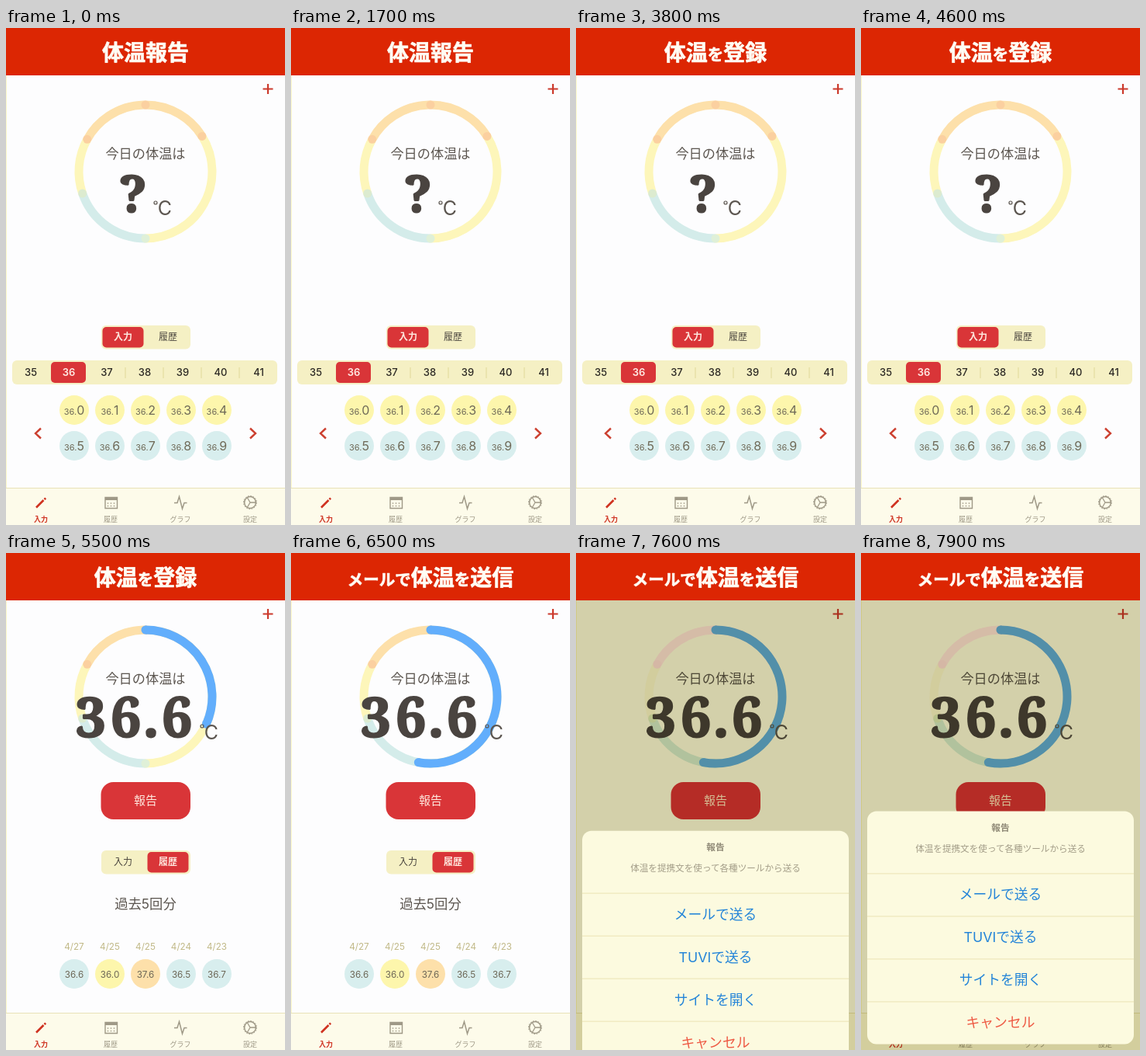
An HTML page for the animation above (8000 ms loop, 360x640 px).

```html
<!DOCTYPE html>
<html lang="ja">
<head>
<meta charset="utf-8">
<style>
  html, body { margin: 0; width: 100%; height: 100%; overflow: hidden; background: #fdfdfe; }
  svg { display: block; width: 360px; height: 640px; }
  text { font-family: Inter, "Noto Sans CJK JP", "Noto Sans CJK", sans-serif; text-anchor: middle; fill: #5c5650; }
  .title text { font-family: "Noto Sans CJK JP", "Noto Sans CJK", sans-serif; font-size: 28px; font-weight: 700;
    fill: #fffdf4; stroke: #fffdf4; stroke-width: .7; stroke-miterlimit: 1; }
  .title .kana { font-size: 20.5px; }
  .value { font-family: "Noto Serif", serif; font-weight: 900; fill: #4a4440; stroke: #4a4440; stroke-width: 2; stroke-miterlimit: 1; }
  .pen { fill: none; }
</style>
</head>
<body>
<svg id="stage" viewBox="0 0 360 640">
  <rect width="360" height="640" fill="#fdfdfe"/>
  <rect y="61" width="1" height="579" fill="#fbf6c8"/>
  <path class="pen" d="M331.500 78.500h13M338 72v13" stroke="#cc3a2c" stroke-width="2.2"/>

  <g id="ring" class="pen" stroke-width="11"></g>
  <text x="180" y="167.500" font-size="17.2">今日の体温は</text>
  <g id="unknown">
    <text class="value" x="164" y="237" font-size="65">?</text>
    <circle cx="193" cy="225" r="2" fill="none" stroke="#5c5650" stroke-width="1.2"/>
    <text x="205" y="241" font-size="25">C</text>
  </g>
  <g id="known">
    <text class="value" x="109.500 154.500 187 220.500" y="236.500" font-size="70">36.6</text>
    <circle cx="253" cy="223" r="2" fill="none" stroke="#5c5650" stroke-width="1.2"/>
    <text x="265" y="239.500" font-size="25">C</text>
  </g>
  <g id="report">
    <rect x="122.500" y="295" width="115.500" height="48" rx="16" fill="#d93538"/>
    <text x="180" y="324" font-size="15" font-weight="500" style="fill:#ffe9df">報告</text>
  </g>

  <rect x="123" y="383" width="115" height="30.500" rx="6" fill="#f5f0c4"/>
  <rect id="thumb" y="385" width="53" height="26.500" rx="5" fill="#d93538"/>
  <text id="tabInput" x="151" y="402" font-size="12">入力</text>
  <text id="tabHistory" x="209" y="402" font-size="12">履歴</text>

  <g id="picker"></g>
  <g id="history"></g>
  <g id="tabbar"></g>

  <rect id="dim" y="61" width="360" height="579" fill="#d5d2ab" style="mix-blend-mode:multiply"/>
  <g id="sheet"></g>

  <rect width="360" height="61" fill="#dc2603"/>
  <g class="title">
    <text x="180" y="42">体温報告</text>
    <text x="180" y="42">体温<tspan class="kana">を</tspan>登録</text>
    <text x="180" y="42"><tspan class="kana">メールで</tspan>体温<tspan class="kana">を</tspan>送信</text>
  </g>
</svg>
<script>
const LOOP = 8000, PICK = 5050, FULL_ANGLE = 190.5;
const TITLE_CUTS = [0, 2600, 6400, LOOP];
const RED = '#d93538', YELLOW = '#fdf6ac', BLUE = '#d8eeee', ORANGE = '#fde0aa', SKY = '#62aefc';
const $ = id => document.getElementById(id);
const clamp = v => Math.max(0, Math.min(1, v));
const ramp = (t, from, to) => clamp((t - from) / (to - from));
const ease = p => (1 - Math.cos(Math.PI * p)) / 2;

function add(parent, tag, attrs, text) {
  const el = document.createElementNS('http://www.w3.org/2000/svg', tag);
  for (const key in attrs) el.setAttribute(key, attrs[key]);
  if (text) el.textContent = text;
  return parent.appendChild(el);
}
function label(parent, text, x, y, size, color, weight = 400) {
  return add(parent, 'text', { x, y, 'font-size': size, 'font-weight': weight, style: 'fill:' + color }, text);
}
const show = (el, on) => { el.style.display = on ? '' : 'none'; };
const mix = (a, b, p) => `rgb(${a.map((v, i) => Math.round(v + (b[i] - v) * p))})`;

// Ring angles run clockwise from the top, in degrees.
function onRing(deg) {
  const a = deg * Math.PI / 180;
  return [180 + 86 * Math.sin(a), 185 - 86 * Math.cos(a)];
}
const arc = (from, to) => `M${onRing(from)}A86 86 0 ${to - from > 180 ? 1 : 0} 1 ${onRing(to)}`;
function place(dot, deg) {
  const [x, y] = onRing(deg);
  dot.setAttribute('cx', x);
  dot.setAttribute('cy', y);
}
function joint(parent, deg, fill) {
  const dot = add(parent, 'circle', { r: 5.5, fill, stroke: 'none' });
  place(dot, deg);
  return dot;
}

const ring = $('ring');
const paleArcs = [[58, 180], [251, 299]].map(([a, b]) => add(ring, 'path', { d: arc(a, b) }));
add(ring, 'path', { d: arc(180, 251), stroke: '#d4ecea' });
const warmArc = add(ring, 'path', { d: arc(299, 418) });
joint(ring, 180, '#dff0d8');
joint(ring, 251, '#dcebd0');
const warmJoints = [299, 0, 58].map(deg => joint(ring, deg, ORANGE));
const gauge = add(ring, 'g', {});
const gaugeArc = add(gauge, 'path', { stroke: SKY });
joint(gauge, 0, SKY);
const gaugeTip = joint(gauge, 0, SKY);

const picker = $('picker');
add(picker, 'rect', { x: 8, y: 428, width: 342, height: 31, rx: 6, fill: '#f5f0c4' });
add(picker, 'rect', { x: 58, y: 430, width: 45, height: 27, rx: 5, fill: RED });
for (let i = 0; i < 7; i++) {
  const on = i === 1;
  label(picker, 35 + i, 32 + 49 * i, 448, 13, on ? '#ffeae4' : '#2c2924', on ? 600 : 500);
  if (i > 1 && i < 6) add(picker, 'path', { d: `M${56 + 49 * i} 437v14`, stroke: '#e0d898' });
}
for (let i = 0; i < 10; i++) {
  const x = 88 + 46 * (i % 5), y = i < 5 ? 492 : 538;
  add(picker, 'circle', { cx: x, cy: y, r: 19, fill: i < 5 ? YELLOW : BLUE });
  const t = label(picker, '36.', x, y + 6, 11, '#6f6a58');
  add(t, 'tspan', { 'font-size': 16 }, String(i));
}
add(picker, 'path', { class: 'pen', d: 'M45 515.500l-7 6.500 7 6.500M315 515.500l7 6.500-7 6.500', stroke: '#cc4030', 'stroke-width': 2.4 });

const history = $('history');
label(history, '過去5回分', 180, 458, 17.3, '#5c5650');
[['4/27', '36.6', BLUE], ['4/25', '36.0', YELLOW], ['4/25', '37.6', ORANGE],
 ['4/24', '36.5', BLUE], ['4/23', '36.7', BLUE]].forEach(([date, temp, fill], i) => {
  const x = 88 + 46 * i;
  label(history, date, x, 511, 11.7, '#c0b886');
  add(history, 'circle', { cx: x, cy: 542, r: 19, fill });
  label(history, temp, x, 546.5, 11.7, '#6c6656');
});

const bar = $('tabbar'), GRAY = '#9f9987';
add(bar, 'rect', { y: 592, width: 360, height: 48, fill: '#fdfbea' });
add(bar, 'rect', { y: 592, width: 360, height: 1, fill: '#e9e2b8' });
['入力', '履歴', 'グラフ', '設定'].forEach((name, i) =>
  label(bar, name, 45 + 90 * i, 636, 9, i ? GRAY : '#cf3220', i ? 400 : 700));
const icon = (d, stroke, width, dash = 'none') =>
  add(bar, 'path', { class: 'pen', d, stroke, 'stroke-width': width, 'stroke-dasharray': dash });
icon('M39 617.500L48.500 608M49.500 607l1.700-1.700', '#cf3220', 2.6);
icon('M128 604.500h15.500v14H128z', GRAY, 1.4);
icon('M128 606.500h15.500', GRAY, 3);
icon('M130.800 612h10M130.800 615.500h10', GRAY, 1.4, '1.4 2.6');
icon('M217 611.500h4l2.500-8 4 15.500 2.500-7.500h3.500', GRAY, 1.5);
add(bar, 'circle', { cx: 315, cy: 611, r: 7.4, fill: 'none', stroke: GRAY, 'stroke-width': 1.5 });
add(bar, 'circle', { cx: 315, cy: 611, r: 8.5, fill: 'none', stroke: GRAY, 'stroke-dasharray': '1.6 1.740' });
icon('M315 611h7M315 611l-3.500-6M315 611l-3.500 6', GRAY, 1.3);

const sheet = $('sheet');
add(sheet, 'rect', { x: 8, y: 332, width: 344, height: 300, rx: 12, fill: '#fcfadf' });
label(sheet, '報告', 180, 357.5, 11.7, '#918b78', 700);
label(sheet, '体温を提携文を使って各種ツールから送る', 180, 384.5, 11.6, '#a39d88');
['メールで送る', 'RULOMで送る', 'サイトを開く', 'キャンセル'].forEach((name, i) => {
  add(sheet, 'rect', { x: 8, y: 412 + 55 * i, width: 344, height: 1, fill: '#ebe3b4' });
  label(sheet, name.replace('RULOM', 'TUVI'), 180, 446 + 55 * i, 17.8, i < 3 ? '#2384d8' : '#ee5a44');
});

const titles = document.querySelectorAll('.title text');

function render(t) {
  titles.forEach((el, i) => show(el, t >= TITLE_CUTS[i] && t < TITLE_CUTS[i + 1]));

  const picked = t >= PICK;
  show($('unknown'), !picked);
  show($('known'), picked);
  show(picker, !picked);
  show(history, picked);
  show(gauge, picked);
  const angle = Math.max(.1, FULL_ANGLE * ease(ramp(t, PICK, 5850)));
  gaugeArc.setAttribute('d', arc(0, angle));
  place(gaugeTip, angle);

  const slide = ease(ramp(t, PICK, 5300));
  $('thumb').setAttribute('x', 124.5 + 58 * slide);
  [[$('tabInput'), slide < .5], [$('tabHistory'), slide >= .5]].forEach(([el, on]) => {
    el.style.fill = on ? '#ffe9df' : '#4a453e';
    el.style.fontWeight = on ? 700 : 400;
  });

  const pressed = t >= 7300 && t < 7450;
  $('report').style.opacity = pressed ? .52 : ramp(t, PICK, 5250);

  const dim = ramp(t, 7420, 7580);
  $('dim').style.opacity = dim;
  paleArcs.forEach(el => el.setAttribute('stroke', mix([253, 246, 186], [252, 249, 234], dim)));
  warmArc.setAttribute('stroke', mix([253, 224, 170], [255, 228, 250], dim));
  warmJoints.forEach(el => el.setAttribute('fill', mix([251, 208, 160], [255, 222, 246], dim)));

  show(sheet, t >= 7420);
  const drop = 308 * Math.exp(-(t - 7420) / 72.8);
  sheet.setAttribute('transform', `translate(0 ${drop.toFixed(2)})`);
}

const start = performance.now();
function tick() {
  render((performance.now() - start) % LOOP);
  requestAnimationFrame(tick);
}
tick();
</script>
</body>
</html>
```
